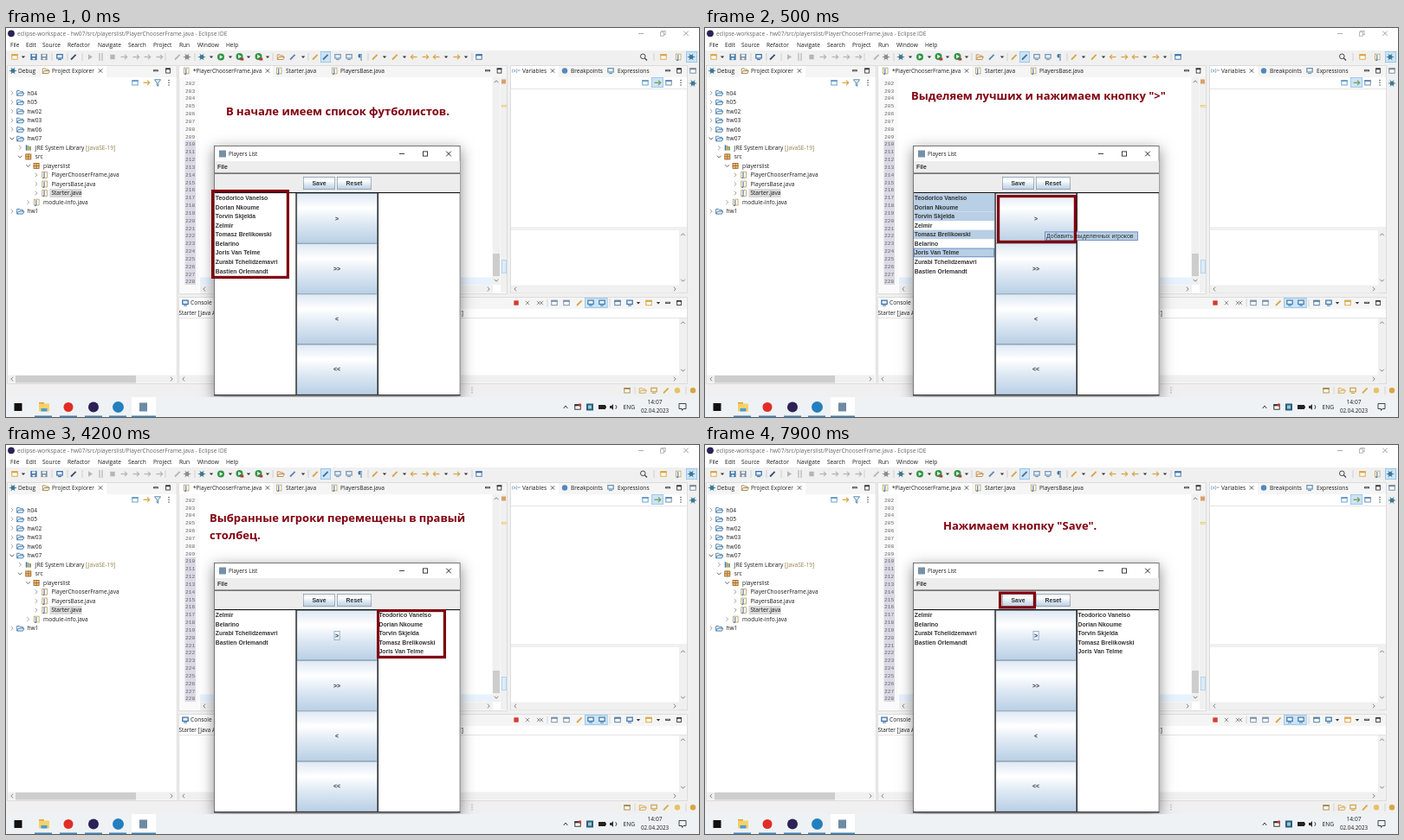
These frames come from a looping animation (800x450 px, 8000 ms). An HTML page with a canvas:

```html
<!DOCTYPE html>
<html lang="ru">
<head>
<meta charset="utf-8">
<title>Players List</title>
<style>
  html, body { margin: 0; width: 100%; height: 100%; overflow: hidden; background: #f0f0f0; }
  canvas { display: block; width: 800px; height: 450px; }
</style>
</head>
<body>
<canvas id="stage" width="800" height="450"></canvas>
<script>
const ctx = document.getElementById('stage').getContext('2d');
const UI = '"Open Sans", "Noto Sans", sans-serif';
const SWING = '"Liberation Sans", Arial, sans-serif';
const MONO = '"Liberation Mono", monospace';
const RED = '#80000f', BLUE = '#3f76a8', GOLD = '#d9a544', GRAY = '#b5b5b5', GREEN = '#319447';

// ---- Primitives ----
function rect(x, y, w, h, fill, stroke, line = 1) {
  if (fill) { ctx.fillStyle = fill; ctx.fillRect(x, y, w, h); }
  if (stroke) {
    ctx.strokeStyle = stroke;
    ctx.lineWidth = line;
    ctx.strokeRect(x + line / 2, y + line / 2, w - line, h - line);
  }
}
function text(str, x, y, { size = 6.6, font = UI, color = '#1c1c1c', bold = false, align = 'left' } = {}) {
  ctx.font = `${bold ? 'bold ' : ''}${size}px ${font}`;
  ctx.fillStyle = color;
  ctx.textAlign = align;
  ctx.fillText(str, x, y + size * 0.35);
}
function path(points, color, width = 0.9, fill = false) {
  ctx.beginPath();
  for (let i = 0; i < points.length; i += 2) ctx.lineTo(points[i], points[i + 1]);
  ctx.strokeStyle = ctx.fillStyle = color;
  ctx.lineWidth = width;
  if (fill) ctx.fill(); else ctx.stroke();
}
function disc(x, y, r, color) {
  ctx.fillStyle = color;
  ctx.beginPath();
  ctx.arc(x, y, r, 0, Math.PI * 2);
  ctx.fill();
}
const chevron = (x, y, dx, dy, color = '#555') => path(
  dx ? [x - dx, y - 2.3, x + dx, y, x - dx, y + 2.3] : [x - 2.3, y - dy, x, y + dy, x + 2.3, y - dy], color);

// ---- Icons, each centred on x, y ----
const icon = {
  caret: (x, y) => path([x - 2.2, y - 1, x + 2.2, y - 1, x, y + 1.5], '#333', 1, true),
  bar: (x, y, c) => rect(x - 0.4, y - 4.5, 0.8, 9, c),
  square: (x, y, c) => rect(x - 2.7, y - 2.7, 5.4, 5.4, c),
  dot: (x, y, c) => disc(x, y, 3.2, c),
  close: (x, y, c = '#333', r = 2.2) => {
    path([x - r, y - r, x + r, y + r], c);
    path([x - r, y + r, x + r, y - r], c);
  },
  window: (x, y, c) => {
    rect(x - 3.7, y - 3.2, 7.4, 6.4, '#fff', c);
    rect(x - 3.7, y - 3.2, 7.4, 2, c);
  },
  disk: (x, y, c) => {
    rect(x - 3.6, y - 3.6, 7.2, 7.2, c);
    rect(x - 2, y - 3, 4, 2.5, '#e8f0f8');
    rect(x - 1.5, y + 1, 3, 2, '#fff');
  },
  screen: (x, y, c) => {
    rect(x - 3.8, y - 3.5, 7.6, 5.6, '#e8f1fa', c, 1.2);
    rect(x - 2, y + 2.6, 4, 1, c);
  },
  pen: (x, y, c) => path([x - 3, y + 3, x + 2.6, y - 2.6], c, 1.8),
  left: (x, y, c) => {
    path([x - 3.5, y, x + 3.5, y], c, 1.3);
    path([x - 1, y - 2.7, x - 3.7, y, x - 1, y + 2.7], c, 1.2);
  },
  right: (x, y, c) => {
    path([x - 3.5, y, x + 3.5, y], c, 1.3);
    path([x + 1, y - 2.7, x + 3.7, y, x + 1, y + 2.7], c, 1.2);
  },
  play: (x, y, c) => path([x - 2, y - 3.2, x + 3, y, x - 2, y + 3.2], c, 1, true),
  run: (x, y) => { disc(x, y, 4, GREEN); path([x - 1.3, y - 2.2, x + 2.3, y, x - 1.3, y + 2.2], '#fff', 1, true); },
  runExtra: (x, y) => { icon.run(x - 0.5, y - 0.5); rect(x + 0.6, y + 1.2, 3.7, 2.8, '#b03c30'); },
  bug: (x, y, c) => {
    for (const a of [0, Math.PI / 3, -Math.PI / 3]) {
      const dx = Math.cos(a) * 4.2, dy = Math.sin(a) * 4.2;
      path([x - dx, y - dy, x + dx, y + dy], c, 0.8);
    }
    disc(x, y, 2.5, c);
  },
  folder: (x, y, c = BLUE) => {
    path([x - 3.8, y + 3, x - 3.8, y - 2.6, x - 0.8, y - 2.6, x, y - 1.5, x + 3, y - 1.5, x + 3, y], c);
    path([x - 3.8, y + 3, x - 2, y, x + 4.4, y, x + 3, y + 3, x - 3.8, y + 3], '#e6f1fa', 1, true);
    path([x - 3.8, y + 3, x - 2, y, x + 4.4, y, x + 3, y + 3, x - 3.8, y + 3], c);
  },
  javaFile: (x, y) => {
    rect(x - 3, y - 3.8, 6.4, 7.6, '#fffdf5', '#b99c61', 0.8);
    text('J', x - 1.3, y, { size: 6.4, bold: true, color: '#2c63a0' });
  },
  library: (x, y) => [BLUE, '#c9963e', '#6a9b63'].forEach((c, i) => rect(x - 3 + i * 2.2, y - 3 + i * 0.8, 1.7, 6.3 - i * 0.8, c)),
  pack: (x, y) => {
    rect(x - 3.4, y - 3.4, 6.8, 6.8, '#ecc987', '#a5692c', 0.9);
    path([x, y - 3.4, x, y + 3.4], '#a5692c');
    path([x - 3.4, y, x + 3.4, y], '#a5692c');
  },
  dots: (x, y, c) => [-2.7, 0, 2.7].forEach(d => disc(x, y + d, 0.8, c)),
  minimize: (x, y) => rect(x - 3, y - 1.2, 6, 2, '#fff', '#333', 0.8),
  maximize: (x, y) => { rect(x - 2.8, y - 3, 5.6, 6, '#fff', '#333', 0.9); rect(x - 2.8, y - 3, 5.6, 1.7, '#333'); },
  search: (x, y, c) => {
    ctx.beginPath();
    ctx.arc(x - 0.7, y - 0.7, 2.8, 0, 7);
    ctx.strokeStyle = c; ctx.lineWidth = 1; ctx.stroke();
    path([x + 1.4, y + 1.4, x + 4, y + 4], c, 1.3);
  },
  filter: (x, y, c) => path([x - 3.5, y - 3.5, x + 3.5, y - 3.5, x + 0.8, y, x + 0.8, y + 4, x - 0.8, y + 3, x - 0.8, y, x - 3.5, y - 3.5], c),
  para: (x, y, c) => text('¶', x, y, { size: 9, color: c, align: 'center' }),
};
function row(y, ...groups) {
  for (const [kind, color, ...xs] of groups) for (const x of xs) icon[kind](x, y, color);
}

// ---- IDE window ----
function scrollX(x0, x1, y, t0, t1) {
  rect(x0, y, x1 - x0, 9, '#f0f0f0');
  chevron(x0 + 5, y + 4.5, -1.2, 0, '#777');
  chevron(x1 - 5, y + 4.5, 1.2, 0, '#777');
  if (t1) rect(t0, y + 0.5, t1 - t0, 8.5, '#cdcdcd');
}
function scrollY(x, y0, y1, t0, t1) {
  rect(x, y0, 9, y1 - y0, '#f0f0f0');
  chevron(x + 4.5, y0 + 5, 0, -1.2, '#777');
  chevron(x + 4.5, y1 - 5, 0, 1.2, '#777');
  if (t1) rect(x + 0.5, t0, 8, t1 - t0, '#cdcdcd');
}
function panel(x, y, w, h, tabX, tabW) {
  rect(x, y, w, h, '#fff', '#dcdcdc');
  rect(x + 1, y + 1, w - 2, 13, '#f5f5f5');
  rect(tabX, y + 1, tabW, 13, '#fff');
}

function drawHeader() {
  rect(0, 0, 800, 26, '#fff');
  disc(6, 6.3, 3.9, '#2c2255');
  text('eclipse-workspace - hw07/src/playerslist/PlayerChooserFrame.java - Eclipse IDE', 13, 6.3, { color: '#666' });
  path([730, 6.5, 736, 6.5], '#999', 0.8);
  rect(756.5, 3, 5, 5, null, '#999', 0.7);
  rect(755, 4.5, 5, 5, '#fff', '#999', 0.7);
  icon.close(785, 6.3, '#999', 2.7);

  const menu = { File: 5, Edit: 23, Source: 42, Refactor: 71, Navigate: 106, Search: 141, Project: 170, Run: 200, Window: 221, Help: 254 };
  for (const [label, x] of Object.entries(menu)) text(label, x, 19.2);

  rect(0, 26, 800, 16, '#f0f0f0');
  rect(363, 27, 12, 13, '#cce4f7', '#90c3ea', 0.8);
  rect(785, 27, 13, 13, '#cce4f7', '#90c3ea', 0.8);
  row(33.5,
    ['window', GOLD, 10, 759], ['disk', BLUE, 32], ['disk', '#7c8fa5', 44], ['screen', '#356da5', 62],
    ['caret', 0, 20, 237, 259, 280, 302, 343, 437, 460, 508, 531],
    ['bar', '#c9c9c9', 53, 71, 88, 184, 218, 308, 349, 418, 538, 748],
    ['pen', '#394f70', 78], ['play', GRAY, 97], ['square', GRAY, 123], ['bar', '#999', 108, 111],
    ['right', GRAY, 136, 150, 163, 177], ['pen', GRAY, 198], ['bug', '#8c8c8c', 209],
    ['bug', '#3d7895', 226, 791], ['run', 0, 248], ['runExtra', 0, 270, 292],
    ['folder', '#c78a3d', 317], ['pen', '#6287b8', 331], ['pen', GOLD, 357], ['pen', '#4c6e91', 369],
    ['screen', '#7896b5', 383, 396], ['para', BLUE, 409], ['pen', GOLD, 426, 449],
    ['left', GOLD, 471, 497], ['right', GOLD, 484, 520], ['window', BLUE, 546],
    ['search', '#444', 736], ['javaFile', 0, 776]);
}

function drawExplorer() {
  panel(1, 43, 197, 369, 40, 76);
  row(49.5, ['bug', '#3d7895', 8], ['folder', '#a98442', 46], ['close', '#444', 109], ['minimize', 0, 173], ['maximize', 0, 187]);
  text('Debug', 14, 49.7);
  text('Project Explorer', 53, 49.7);
  row(63.3, ['window', '#6ca0cc', 149], ['right', GOLD, 162], ['filter', BLUE, 175], ['dots', '#555', 188]);

  // label, depth, icon, expansion state: '>' closed, 'v' open
  const tree = [
    ['h04', 0, 'folder', '>'], ['h05', 0, 'folder', '>'], ['hw02', 0, 'folder', '>'], ['hw03', 0, 'folder', '>'],
    ['hw06', 0, 'folder', '>'], ['hw07', 0, 'folder', 'v'], ['JRE System Library', 1, 'library', '>'],
    ['src', 1, 'pack', 'v'], ['playerslist', 2, 'pack', 'v'], ['PlayerChooserFrame.java', 3, 'javaFile', '>'],
    ['PlayersBase.java', 3, 'javaFile', '>'], ['Starter.java', 3, 'javaFile', '>'],
    ['module-info.java', 2, 'javaFile', '>'], ['hw1', 0, 'folder', '>'],
  ];
  tree.forEach(([label, depth, kind, state], i) => {
    const x = 7 + depth * 9.3, y = 75.2 + i * 10.53;
    if (label === 'Starter.java') rect(50.5, y - 5, 37, 10, '#d9d9d9');
    if (state === 'v') chevron(x, y, 0, 1.2); else chevron(x, y, 1.2, 0, '#999');
    icon[kind](x + 9.5, y);
    text(label, x + 17.5, y);
    if (kind === 'library') text('[JavaSE-19]', 92, y, { color: '#957d47' });
  });
  scrollX(2, 196, 401.5, 11, 150);
}

function drawEditor() {
  panel(199, 43, 380, 265, 200, 108);
  row(49.5, ['javaFile', 0, 208, 315, 379], ['close', '#444', 302], ['minimize', 0, 556], ['maximize', 0, 569.5]);
  text('*PlayerChooserFrame.java', 216, 49.7, { size: 6.4 });
  text('Starter.java', 323, 49.7);
  text('PlayersBase.java', 386, 49.7);
  rect(200, 57, 23, 249, '#fafafa');
  rect(206.5, 130, 12.5, 167, '#dcd9e6');
  rect(224, 288.5, 338, 8.7, '#e8f2fe');
  for (let n = 202; n <= 228; n++) {
    text(n, 218.2, 63.6 + (n - 202) * 8.83, { size: 6.2, font: MONO, color: '#666', align: 'right' });
  }
  scrollY(561.5, 57, 297, 261, 287);
  rect(571, 57, 7, 249, '#f0f0f0');
  rect(572, 59.5, 5, 5, '#d9a06a');
  rect(572, 89, 5.5, 2.5, '#fff3c4', '#e1bf67', 0.7);
  rect(572, 268, 6, 16, '#dcecf8', '#a9cbe4', 0.7);
  scrollX(224, 562, 297.5);
}

function drawVariables() {
  panel(582, 43, 205, 264, 583, 55);
  text('(x)=', 584, 49.3, { size: 5.8, color: BLUE });
  row(49.5, ['close', '#444', 631], ['dot', '#5488bd', 645], ['screen', '#6b93ad', 698], ['minimize', 0, 764], ['maximize', 0, 777]);
  text('Variables', 596, 49.7);
  text('Breakpoints', 652, 49.7);
  text('Expressions', 706, 49.7);
  rect(745, 57, 14, 12, '#cce4f7', '#90c3ea', 0.8);
  row(63.3, ['window', '#6ca0cc', 738], ['right', '#779d5d', 752], ['window', '#6c8faf', 765], ['dots', '#555', 779]);
  rect(583, 70, 203, 1, '#e4e4e4');
  rect(583, 230, 203, 4, '#f0f0f0');
  scrollY(777, 234, 297);
  scrollX(583, 777, 297.5);
  rect(777, 297, 9, 9, '#f0f0f0');
  icon.window(793, 49.5, '#7a8ba0');
  icon.bug(793, 64, '#3d7895');
}

function drawConsole() {
  panel(199, 311, 588, 101, 200, 60);
  icon.screen(207, 318, '#356da5');
  text('Console', 213, 318);
  text('Starter [Java Application]', 199.5, 329.5, { size: 6.4 });
  text('2]', 522, 329.5);
  rect(199, 335, 588, 0.8, '#ddd');
  rect(668, 312, 26.5, 12, '#cce4f7', '#90c3ea', 0.8);
  row(318,
    ['square', '#d53c2e', 589], ['close', '#888', 602, 615, 618], ['bar', '#ccc', 625, 697],
    ['window', '#7890aa', 633, 647], ['pen', GOLD, 662], ['screen', BLUE, 675, 688, 720],
    ['window', '#547f9f', 706], ['caret', 0, 730, 753], ['window', GOLD, 742],
    ['minimize', 0, 764], ['maximize', 0, 777]);
  scrollY(777, 336, 401);
  scrollX(200, 777, 401.5);
  rect(777, 401, 9, 10, '#f0f0f0');
}

function drawStatusBar() {
  icon.dots(538, 419, '#b0b0b0');
  row(419.3, ['window', '#a98e55', 717], ['folder', '#dfa645', 735], ['screen', '#d5a043', 748],
    ['pen', GOLD, 762], ['dot', '#e7c267', 775], ['dot', '#d9a544', 793], ['bar', '#ccc', 726, 785]);
}

function drawTaskbar() {
  rect(0, 427, 800, 23, '#eff2f5');
  rect(145, 427, 28, 23, '#fff');
  rect(9.5, 434, 9, 9, '#111');
  rect(38, 433, 6, 3, '#dba53b');
  rect(38, 434.5, 12, 9, '#f7d16b');
  rect(40.5, 440, 7, 3.5, '#4c9cd2');
  disc(72, 438.5, 5.5, '#e12d26');
  disc(101, 438.5, 6, '#2c2255');
  disc(129.5, 438.5, 6.5, '#237fbd');
  rect(154, 433.5, 9, 10, '#6f8aa3');
  for (const x of [33, 62, 91, 119]) rect(x, 448.5, 20, 1.5, '#3c83b9');
  rect(145, 448.5, 28, 1.5, '#3c83b9');

  chevron(646, 438.5, 0, -1.5, '#222');
  icon.window(660, 438.5, '#333');
  disc(662.5, 436, 1.7, '#ca3b34');
  rect(670, 434.5, 8, 8, '#285f7e');
  rect(672, 436.5, 4, 4, '#99c6d2');
  rect(684, 436, 8, 5, '#222');
  rect(692, 437.4, 1, 2.2, '#222');
  path([697, 437, 699, 437, 701, 435, 701, 442, 699, 440, 697, 440], '#333', 1, true);
  ctx.beginPath(); ctx.arc(701.5, 438.5, 3.2, -0.8, 0.8); ctx.stroke();
  text('ENG', 712.5, 438.5, { size: 6.7 });
  text('14:07', 749, 433, { align: 'center' });
  text('02.04.2023', 749, 443, { size: 6.3, align: 'center' });
  path([777, 434.5, 785, 434.5, 785, 440.5, 782, 440.5, 780.5, 442.5, 780.5, 440.5, 777, 440.5, 777, 434.5], '#333');
}

// ---- Players dialog ----
function metalButton(x, y, w, h, label, border = '#7a8a99') {
  const g = ctx.createLinearGradient(0, y, 0, y + h);
  [[0, '#dde8f3'], [0.3, '#fff'], [0.6, '#dde8f3'], [1, '#b8cfe5']].forEach(stop => g.addColorStop(...stop));
  rect(x, y, w, h, g, border, 0.6);
  text(label, x + w / 2, y + h / 2, { size: 6.9, font: SWING, bold: true, color: '#333', align: 'center' });
}
function list(names, x, selected = [], focused = -1) {
  names.forEach((name, i) => {
    const y = 191.5 + i * 10.53;
    if (selected.includes(i)) rect(x, y, 93, 10.5, '#b8cfe5', i === focused ? '#6382bf' : null, 0.8);
    text(name, x + 0.8, y + 5.4, { size: 6.85, font: SWING, bold: true, color: '#333' });
  });
}
function dropShadow() {
  ctx.save();
  ctx.shadowColor = 'rgba(0, 0, 0, 0.45)';
  ctx.shadowBlur = 15;
  ctx.shadowOffsetY = 4;
  rect(240, 136, 284.5, 289.5, '#fff');
  ctx.restore();
}
function drawDialog(scene) {
  dropShadow();
  rect(240, 136, 284.5, 289.5, '#fff', '#555', 0.8);
  rect(246, 141.5, 8, 8, '#7690a8');
  text('Players List', 257, 145.7, { size: 6.4 });
  path([454, 145.5, 460, 145.5], '#111', 0.8);
  rect(481, 142.5, 6, 6, null, '#111', 0.8);
  icon.close(511, 145.5, '#111', 2.8);
  rect(241, 154, 283, 36, '#eeeded');
  text('File', 244, 160.8, { size: 6.85, font: SWING, bold: true, color: '#333' });
  rect(241, 167.6, 283, 1, '#222');
  metalButton(343, 172, 37, 15, 'Save');
  metalButton(382, 172, 40, 15, 'Reset');
  ['>', '>>', '<', '<<'].forEach((label, i) =>
    metalButton(335.5, 191 + i * 58.3, 93.2, 58.3, label, scene.moved && !i ? '#52697d' : undefined));
  if (scene.moved) rect(378.6, 215, 7, 11, null, '#8aa5c4', 0.8);
  rect(241, 190, 283, 1.1, '#111');
  rect(334.4, 190, 1.2, 235, '#111');
  rect(428.7, 190, 1.2, 235, '#111');
  rect(240, 424, 284.5, 1.2, '#333');

  const isBest = (_, i) => best.includes(i);
  if (scene.moved) {
    list(players.filter((_, i) => !isBest(_, i)), 241);
    list(players.filter(isBest), 429.7);
  } else {
    list(players, 241, scene.selected, 6);
  }
  if (scene.tooltip) {
    rect(392, 235.5, 108, 10.5, '#b8cfe5', '#6382bf', 0.8);
    text(scene.tooltip, 394, 240.8, { size: 7, font: SWING, color: '#333' });
  }
}

// ---- Scenes ----
const players = ['Teodorico Vanelso', 'Dorian Nkoume', 'Torvin Skjelda', 'Zelmir', 'Tomasz Brelikowski',
  'Belarino', 'Joris Van Telme', 'Zurabi Tchelidzemavri', 'Bastien Orlemandt'];
const best = [0, 1, 2, 4, 6];
const scenes = [
  { start: 0, caption: ['В начале имеем список футболистов.'], at: [254, 96], frame: [237, 187, 90, 103] },
  { start: 500, caption: ['Выделяем лучших и нажимаем кнопку ">"'], at: [238, 78], frame: [337, 193, 92, 56],
    selected: best, tooltip: 'Добавить выделенных игроков' },
  { start: 4200, caption: ['Выбранные игроки перемещены в правый', 'столбец.'], at: [235, 84.3],
    frame: [428, 190, 80, 57], moved: true },
  { start: 7900, caption: ['Нажимаем кнопку "Save".'], at: [275, 93.3], frame: [339, 169.5, 43, 20], moved: true },
];

function draw(now) {
  const time = now % 8000;
  const scene = scenes.findLast(s => time >= s.start);
  rect(0, 0, 800, 450, '#f0f0f0');
  drawHeader();
  drawExplorer();
  drawEditor();
  drawVariables();
  drawConsole();
  drawStatusBar();
  drawDialog(scene);
  drawTaskbar();
  const [x, y] = scene.at;
  scene.caption.forEach((line, i) => text(line, x, y + i * 19.8, { size: 13, bold: true, color: RED }));
  rect(...scene.frame, null, RED, 3.2);
}

const startTime = performance.now();
function tick() {
  draw(performance.now() - startTime);
  requestAnimationFrame(tick);
}
tick();
</script>
</body>
</html>
```
